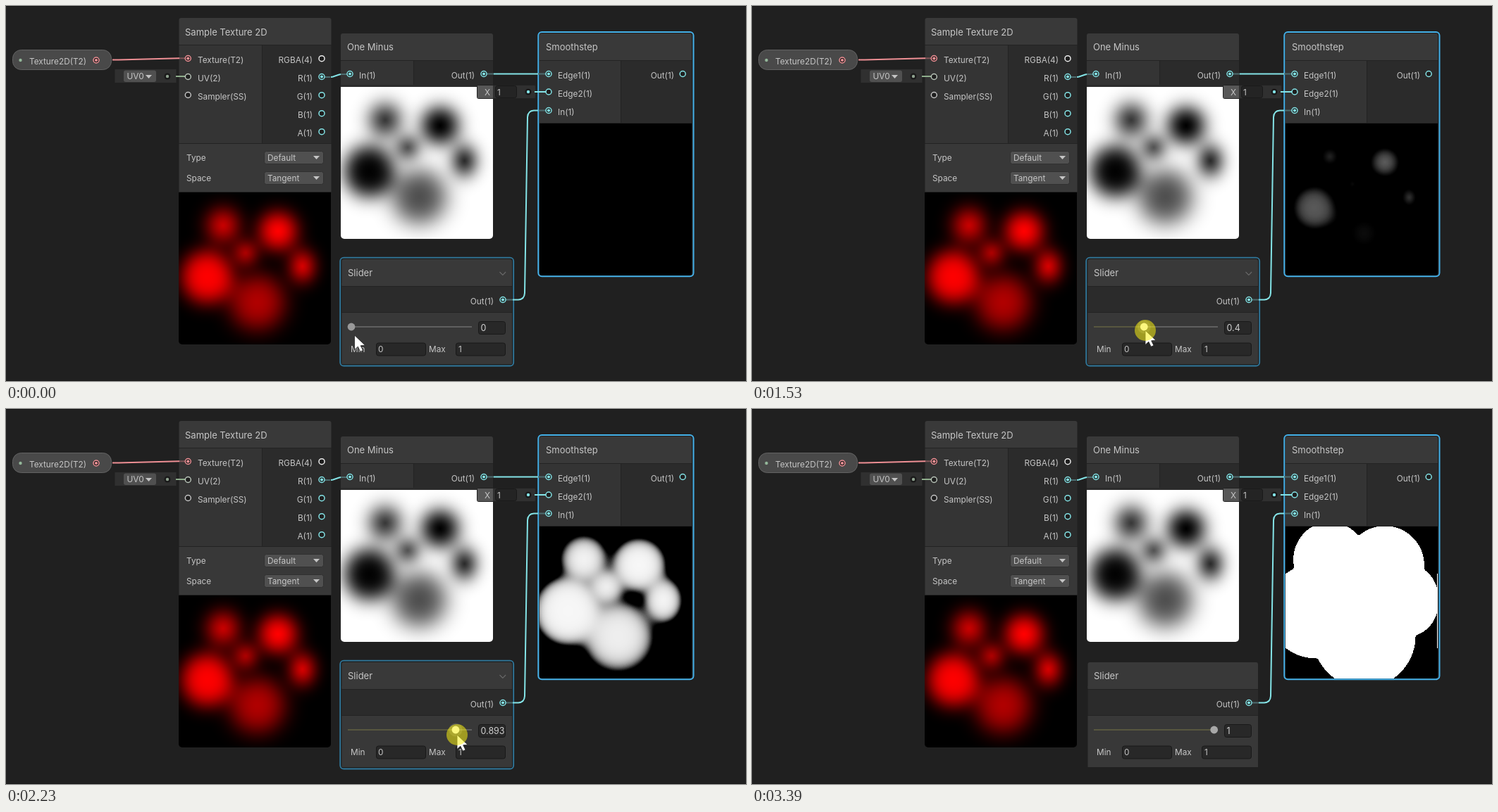
Write an HTML page with a canvas that moves like this. It is 1050x533 px and loops after 3.46 s.

```html
<!DOCTYPE html>
<html lang="en">
<head>
<meta charset="utf-8">
<title>Smoothstep node graph</title>
<style>
html, body { margin: 0; width: 100%; height: 100%; overflow: hidden; background: #202020; }
canvas, svg { position: absolute; display: block; }
canvas { width: 215.5px; height: 215.5px; }
svg { left: 0; top: 0; }
text { font-family: Inter, Roboto, sans-serif; white-space: pre; }
#red { left: 245.2px; top: 265px; border-radius: 0 0 5px 5px; }
#inv { left: 475px; top: 115px; border-radius: 0 0 5px 5px; }
#out { left: 757px; top: 167px; border-radius: 0 0 4px 4px; }
</style>
</head>
<body>
<canvas id="red" width="216" height="216"></canvas>
<canvas id="inv" width="216" height="216"></canvas>
<canvas id="out" width="216" height="216"></canvas>
<svg id="stage" width="1050" height="533" viewBox="0 0 1050 533"></svg>
<script>
const LOOP = 3460, SIZE = 216;
const CYAN = '#84e4e7', DIM = '#4d6d70', PINK = '#ee8f94';
const HEAD = '#393939', INPUT = '#343434', OUTPUT = '#2b2b2b', LABEL = '#c6c6c6';
const $ = id => document.getElementById(id);

// --- Static graph ---
const rect = (x, y, w, h, fill, more = '') =>
  `<rect x="${x}" y="${y}" width="${w}" height="${h}" fill="${fill}" ${more}/>`;
const label = (x, y, s, more = '') =>
  `<text x="${x}" y="${y}" font-size="11.8" fill="${LABEL}" ${more}>${s}</text>`;
const right = (x, y, s) => label(x, y, s, 'text-anchor="end"');
const title = (x, y, s) => label(x, y, s, 'style="font-size:13px"');
const line = (d, color, w = 2, more = '') =>
  `<path d="${d}" fill="none" stroke="${color}" stroke-width="${w}" ${more}/>`;
const port = (x, y, color = CYAN, on = false) =>
  `<circle cx="${x}" cy="${y}" r="4" fill="#1f1f1f" stroke="${color}" stroke-width="1.5"/>` +
  (on ? `<circle cx="${x}" cy="${y}" r="2.1" fill="${color}"/>` : '');
const plug = (x, y, color) =>
  `<circle cx="${x}" cy="${y}" r="4.5" fill="#191919"/><circle cx="${x}" cy="${y}" r="2.2" fill="${color}"/>`;
const field = (x, y, w) =>
  rect(x + .5, y + .5, w - 1, 18, '#282828', 'rx="3" stroke="#191919"');
const arrow = (x, y) => `<path d="M${x} ${y}h9l-4.5 5z" fill="#c4c4c4"/>`;
const dropdown = (x, y, w, s) =>
  rect(x + .5, y + .5, w - 1, 18, '#505050', 'rx="3" stroke="#303030"') +
  label(x + 5, y + 13.5, s) + arrow(x + w - 15, y + 7);

// Header plus the two port columns
const node = (x, y, w, split, bottom) =>
  `<path d="M${x} ${y + 38}v-35q0 -3 3 -3h${w - 6}q3 0 3 3v35z" fill="${HEAD}"/>` +
  rect(x, y + 38, w, bottom - y - 38, '#232323') +
  rect(x, y + 39, split - x, bottom - y - 40, INPUT) +
  rect(split + 1, y + 39, x + w - split - 1, bottom - y - 40, OUTPUT);

function graph() {
  let s = rect(0, 0, 1050, 1, '#151515') + rect(0, 532, 1050, 1, '#171717');

  // Property pill
  s += rect(9.5, 62.5, 140, 28, '#494949', 'rx="12" stroke="#626262"') +
    '<circle cx="20.5" cy="77" r="2.2" fill="#93b79a"/>' +
    label(33, 83, 'Texture2D(T2)') + port(128, 77, PINK, true);

  // Sample node
  s += node(245.5, 17, 216, 363, 196) + rect(245.5, 196, 216, 68, '#383838') +
    rect(245.5, 264, 216, 1, '#222') + title(254, 41.5, 'Sample Texture 2D') +
    label(272, 80.8, 'Texture(T2)') + label(272, 106.7, 'UV(2)') + label(272, 132.7, 'Sampler(SS)');
  ['RGBA(4)', 'R(1)', 'G(1)', 'B(1)', 'A(1)'].forEach((name, i) => {
    s += right(435, 80.8 + 26 * i, name);
    if (i !== 1) s += port(448, 74.7 + 26 * i, i ? CYAN : '#ececec');
  });
  s += label(256, 219.7, 'Type') + label(256, 248.5, 'Space') +
    dropdown(366, 206, 85, 'Default') + dropdown(366, 235, 85, 'Tangent');
  s += line('M151 76.5L160 76.4L236 74.4L246 74.3', PINK) + line('M246 74.3H258', '#805558') +
    port(258.3, 74.5, PINK, true);

  // UV widget
  s += rect(154.5, 90, 87, 19, '#303030') + rect(167, 91.5, 46, 16.5, '#505050', 'rx="3"') +
    label(171.5, 104, 'UV0') + arrow(198, 98) +
    line('M241 100H258', '#8fae8c') + plug(229, 100, '#8fa18f') +
    port(258.3, 100.5, '#b9c4b9') + port(258.3, 126.5, '#c4c4c4');

  // One Minus node
  s += node(475, 39, 216, 578, 113) + rect(475, 112, 216, 3, '#2c2c2c') +
    title(484, 63, 'One Minus') + label(501, 102.5, 'In(1)') + right(665, 102.5, 'Out(1)');

  // Smoothstep node
  s += node(757, 39, 216, 872, 167) + title(766, 63, 'Smoothstep') +
    label(783, 102.5, 'Edge1(1)') + label(783, 128.5, 'Edge2(1)') + label(783, 154.5, 'In(1)') +
    right(948, 102.5, 'Out(1)') + port(960.2, 96.5) +
    rect(755.3, 37, 220.2, 347.2, 'none', 'rx="5" stroke="#44b0e8" stroke-width="2"');

  // Slider node
  s += rect(476.5, 360, 241.5, 38, HEAD, 'rx="3"') + rect(476.5, 394, 241.5, 4, HEAD) +
    rect(476.5, 398, 241.5, 111, '#232323') + rect(476.5, 399, 241.5, 36, OUTPUT) +
    rect(476.5, 436, 241.5, 73, '#383838');
  s += `<g id="sel">${rect(474.2, 357.7, 246, 153.8, 'none', 'rx="5" stroke="#30789c" stroke-width="1.8"')}
    ${line('M700.5 378l4.3 4.3l4.3 -4.3', '#686868', 1.2)}</g>`;
  s += title(485, 384.3, 'Slider') + right(692, 423.7, 'Out(1)') +
    line('M485 456H661', '#5f5f5f') + line('', '#58573f', 2, 'id="trail"') +
    field(670, 448, 39) + field(525, 478.5, 71) + field(638, 478.5, 71) +
    label(489, 492, 'Min') + label(528, 492, '0') + label(600, 492, 'Max') + label(642, 492, '1');

  // Wires
  s += line('M448 101H460', DIM) + line('M461 101L464 100.5L472 97.8L475 97', CYAN) +
    line('M475 97H488', DIM) + port(448, 100.5, CYAN, true) + port(488, 96.5, CYAN, true) +
    line('M678 96.5H692M755 96.5H770', DIM) + line('M692 96.5H755', CYAN) +
    port(678, 96.5, CYAN, true) + port(770, 96.5, CYAN, true) +
    line('M705 417.5H719M756 148.5H770', DIM) +
    line('M719 417.5H727Q735.5 417 736 408L740 158Q740.5 149 749 148.5H755', CYAN) +
    port(705, 417.5, CYAN, true) + port(770, 148.5, CYAN, true);

  // Float widget
  s += rect(668.5, 112.5, 83, 19, '#303030', 'rx="2" stroke="#222"') +
    rect(669, 113, 22, 18, '#575757') + label(679, 126.5, 'X') +
    rect(694.5, 113.5, 30, 17, '#242424', 'rx="3" stroke="#191919"') + label(697, 126.5, '1') +
    line('M750 122H768', CYAN) + plug(741, 122, CYAN) + port(770, 122);

  // Moving parts
  s += `<clipPath id="box"><rect x="671" y="448" width="37.3" height="18"/></clipPath>
    <g clip-path="url(#box)"><text id="num" x="673.5" y="462" font-size="12.5" fill="#d0d0d0"></text></g>
    <circle id="halo" cy="456" r="9.5" fill="#fff" opacity=".14"/>
    <circle id="knob" cy="456" r="5.4"/>
    <path id="hand" d="M0 0V20.5L4.8 16.2L8.2 23.2L12 21.5L8.7 14.8L15 14.2Z"
      fill="#fff" stroke="#222" stroke-width=".8" stroke-linejoin="round"/>
    <circle id="press" r="15" fill="#faf010" opacity=".54"/>`;
  return s;
}
$('stage').innerHTML = graph();

// --- Texture: soft discs [x, y, radius, blur, strength, vertical scale] ---
const discs = [
  [63, 47, 18.6, 13.2, .85, 1.03], [141, 55, 23.3, 12.6, 1.04, 1], [95, 86, 12.8, 11, .76, 1],
  [175.5, 105, 14.2, 11, .93, 1.2], [40.5, 120, 33.2, 12.4, 1, 1.03], [111.5, 156, 35, 15.5, .7, 1]
];
const tail = z => 1 / (1 + Math.exp(1.5976 * z + .07056 * z * z * z));
function level(x, y) {
  let v = 0;
  for (const [cx, cy, r, blur, k, tall] of discs) {
    const d = Math.hypot(x - cx, (y - cy) / tall);
    v += Math.max(0, k * tail((d - r) / blur) - .003);
  }
  return Math.round(Math.min(1, v) * 255) / 255;
}
const tex = new Float32Array(SIZE * SIZE);
for (let y = 0; y < SIZE; y++) {
  for (let x = 0; x < SIZE; x++) tex[y * SIZE + x] = level(x + .5, y + .5);
  // the texture repeats, so the left side bleeds into the last column
  tex[y * SIZE + SIZE - 1] += tex[y * SIZE] * .1;
}

function paint(id, shade) {
  const ctx = $(id).getContext('2d'), img = ctx.createImageData(SIZE, SIZE);
  tex.forEach((v, i) => {
    const [r, g] = shade(v);
    img.data.set([r * 255, g * 255, g * 255, 255], i * 4);
  });
  ctx.putImageData(img, 0, 0);
}
function smooth(v, s) {
  if (v <= 0) return 0;
  const t = Math.max(0, Math.min(1, (s - 1 + v) / v));
  return t * t * (3 - 2 * t);
}
paint('red', v => [v, 0]);
paint('inv', v => [1 - v, 1 - v]);

// --- Motion ---
// bursts of screen updates: first, last, count
const bursts = [[130, 520, 6], [660, 790, 2], [990, 1460, 8], [1530, 2030, 8],
  [2100, 2580, 8], [2650, 3120, 7], [3390, 3390, 1]];
const ticks = bursts.flatMap(([a, b, n]) =>
  Array.from({ length: n }, (_, k) => a + k * (b - a) / Math.max(1, n - 1)));
const hold = t => ticks.reduce((last, k) => k <= t + 8 ? k : last, 0);

const slide = [[660, 0], [790, .012], [923, .012], [1460, .36], [1530, .4],
  [1815.7, .646], [2237.1, .893], [2511.4, .997], [2580, 1]];
const path = [[60, 494.5, 468], [520, 492, 457.5], [923, 492, 457.5], [1530, 558, 461],
  [1815.7, 598, 461], [2237.1, 640, 463], [2511.4, 657, 465], [2580, 658, 466],
  [2885, 860, 490], [3042, 920, 522], [3120, 936, 546]];
function at(keys, t, i = 1) {
  if (t <= keys[0][0]) return keys[0][i];
  for (let k = 1; k < keys.length; k++) {
    const a = keys[k - 1], b = keys[k];
    if (t <= b[0]) return a[i] + (b[i] - a[i]) * (t - a[0]) / (b[0] - a[0]);
  }
  return keys[keys.length - 1][i];
}

const show = (id, on) => $(id).setAttribute('visibility', on ? 'visible' : 'hidden');
let shown = -1;
function draw(time) {
  const t = hold(time % LOOP), s = at(slide, t);
  const x = at(path, t), y = at(path, t, 2), knob = 490 + 165.7 * s;
  const down = t >= 660 && t < 2650;
  $('knob').setAttribute('cx', knob);
  $('halo').setAttribute('cx', knob);
  $('knob').setAttribute('fill', down ? '#fff' : t >= 430 && t < 660 ? '#e0e0e0' : t > 2000 ? '#a8a8a8' : '#999');
  $('trail').setAttribute('d', s > 0 ? `M485 456H${knob}` : '');
  $('press').setAttribute('cx', x);
  $('press').setAttribute('cy', y);
  $('hand').setAttribute('transform', `translate(${x} ${y})`);
  $('num').textContent = String(+s.toFixed(3));
  show('press', down);
  show('halo', t >= 660 && t < 3390);
  show('sel', t < 2950);
  if (s !== shown) {
    paint('out', v => { const g = smooth(v, s); return [g, g]; });
    shown = s;
  }
}
const start = performance.now();
function loop() {
  draw(performance.now() - start);
  requestAnimationFrame(loop);
}
loop();
</script>
</body>
</html>
```
